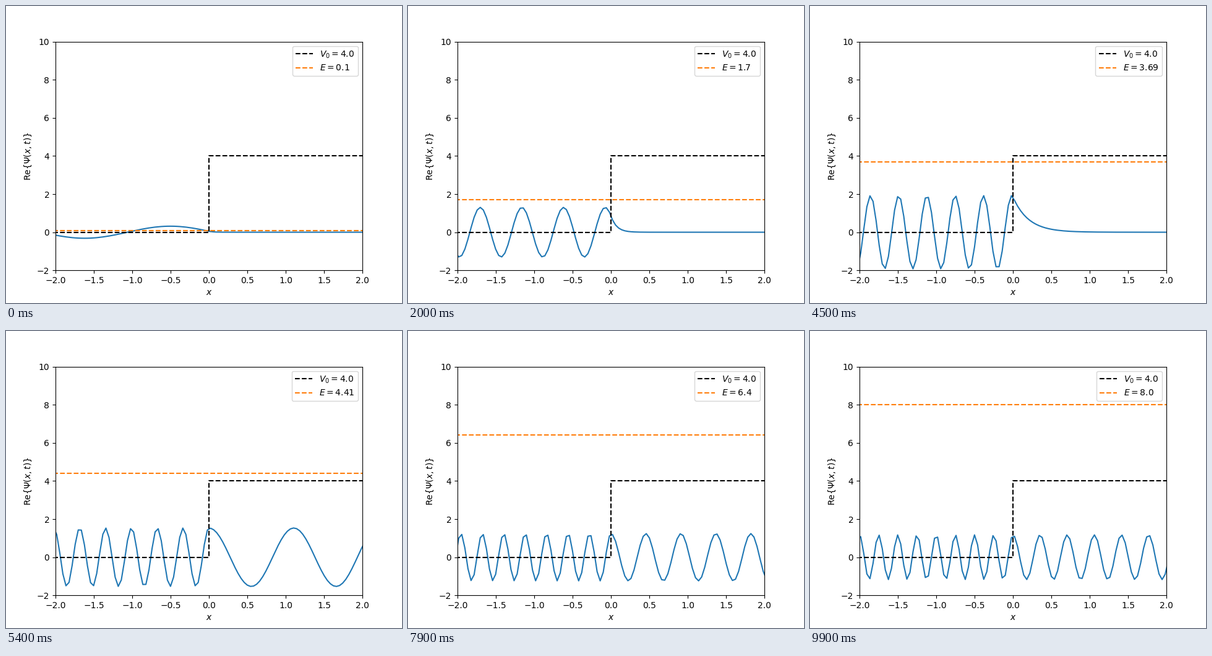
These frames come from a looping animation (640 by 480 pixels, 10 s). A matplotlib script:

```python
import numpy as np
import matplotlib.pyplot as plt
from matplotlib.animation import FuncAnimation

V0 = 4.0
HBAR = 1 / (2 * np.pi)
MASS = 1.0
FRAMES = 100
INTERVAL = 100

x = np.linspace(-10, 10, 500)
energies = np.linspace(0.1, 8.0, FRAMES)


def wavenumber(kinetic):
    return np.sqrt(2 * MASS * kinetic + 0j) / HBAR


def psi(energy):
    """Stationary scattering state of a potential step at x = 0."""
    k = wavenumber(energy)
    q = wavenumber(energy - V0)
    r = (k - q) / (k + q)
    t = 2 * k / (k + q)
    left = np.exp(1j * k * x) + r * np.exp(-1j * k * x)
    right = t * np.exp(1j * q * x)
    return np.where(x < 0, left, right).real


fig, ax = plt.subplots(figsize=(6.4, 4.8), dpi=100)
wave, = ax.plot(x, psi(energies[0]))
ax.plot([-10, 0, 0, 10], [0, 0, V0, V0], "k--", label=f"$V_0={V0}$")
level, = ax.plot([-10, 10], [energies[0]] * 2, "C1--")
ax.set_xlim(-2, 2)
ax.set_ylim(-2, 10)
ax.set_xlabel("$x$")
ax.set_ylabel(r"Re$\{\Psi(x,t)\}$")


def update(i):
    energy = energies[i]
    wave.set_ydata(psi(energy))
    level.set_ydata([energy, energy])
    level.set_label(f"$E={round(float(energy), 2)}$")
    ax.legend(loc="upper right")
    return wave, level


anim = FuncAnimation(fig, update, frames=FRAMES, interval=INTERVAL,
                     repeat=True, repeat_delay=0)
plt.show()
```
